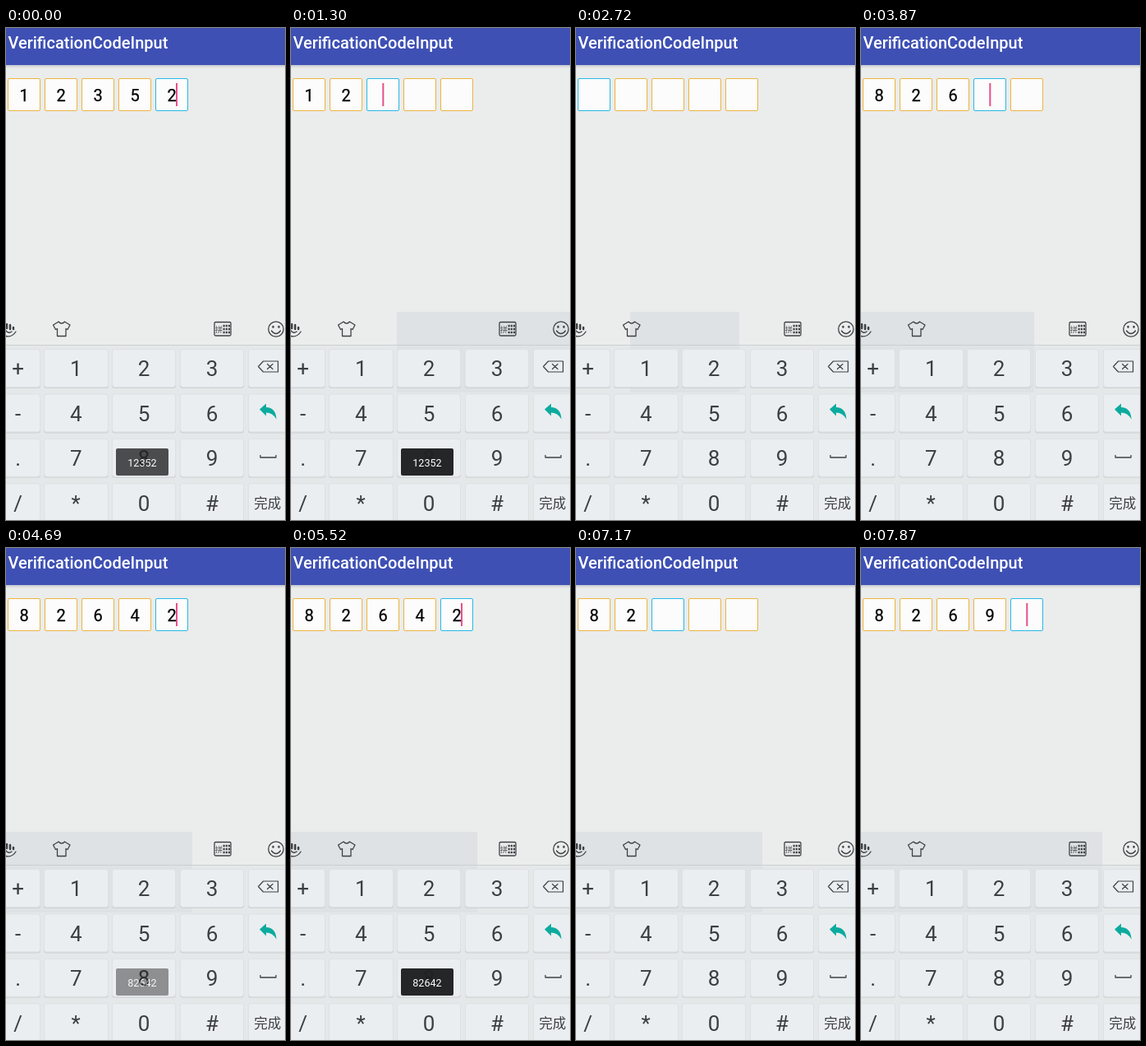
Recreate the animation shown at these times as an HTML page. Size 340x598 px, loop 7990 ms.

```html
<!DOCTYPE html>
<html lang="en">
<head>
<meta charset="utf-8">
<title>VerificationCodeInput</title>
<style>
  html, body { margin: 0; width: 100%; height: 100%; overflow: hidden; background: #ebecec; }
  svg { display: block; width: 340px; height: 598px; font-family: Roboto, "Noto Sans", sans-serif; }
  .mid { text-anchor: middle; }
  .key { fill: #ebeef0; stroke: #dee1e3; }
  .key.down { fill: #d0d5d8; }
  .label { font-size: 26px; fill: #3c3f42; }
  .icon { fill: none; stroke: #3f4245; stroke-width: 1.3; stroke-linejoin: round; stroke-linecap: round; }
  .cjk { font-family: "Noto Sans CJK SC", "Noto Sans CJK", sans-serif; }
  .box { fill: #fbfcfb; stroke: #ecb440; }
  .box.on { stroke: #27b9e6; }
</style>
</head>
<body>
<svg viewBox="0 0 340 598" id="stage">
  <defs>
    <linearGradient id="drop" x2="0" y2="1">
      <stop stop-color="#c6c8ce"/>
      <stop offset="1" stop-color="#ebecec"/>
    </linearGradient>
  </defs>
  <rect width="340" height="598" fill="#ebecec"/>
  <rect width="340" height="45" fill="#3e50b4"/>
  <rect y="45" width="340" height="4" fill="url(#drop)"/>
  <text x="2.4" y="24.600" font-size="20" font-weight="500" fill="#fff">VerificationCodeInput</text>

  <g id="boxes"></g>
  <rect id="caret" y="67" width="2" height="28" fill="#e8508a"/>
  <path id="handle" d="M162.300 96.500L171 106V126.500Q171 128 169.500 128H155Q153.500 128 153.500 126.500V106Z" fill="#434547"/>

  <rect y="386" width="340" height="212" fill="#e5e8e9"/>
  <rect id="shade" y="345" height="98" fill="#dfe2e4"/>
  <rect y="385" width="340" height="1" fill="#cdd0d2"/>

  <g class="icon">
    <path d="M-2 374Q7 377 12 369M0 368Q3 372 7 369"/>
    <path d="M1 360V365M5 361V366M9 364V366" stroke-width="2.500"/>
    <path d="M64 357L57.500 361L60.500 366.500L62.500 365.500V374.500H73V365.500L75 366.500L78 361L71.500 357Q67.800 361 64 357Z"/>
    <rect x="254" y="357.500" width="20" height="16.500" rx="1.500"/>
    <path d="M264.500 362H273M264.500 366H273M264.500 370H273" stroke-width="2.300" stroke-dasharray="2.200 1" stroke-linecap="butt"/>
    <circle cx="329" cy="366" r="9.200"/>
    <path d="M323.500 368Q329 375 334.500 368"/>
    <path d="M325.500 363V363.500M332.500 363V363.500" stroke-width="2.400"/>
  </g>
  <text class="mid cjk" x="259.500" y="369.500" font-size="9" fill="#3f4245">拼</text>

  <g id="keys"></g>
  <g class="icon">
    <path d="M307.500 411.500L313.500 405H331.500V418H313.500Z" stroke-width="1.200"/>
    <path d="M318.500 408.500L325 414.500M325 408.500L318.500 414.500" stroke-width="1.200"/>
    <path d="M310 519V522H329V519" stroke-linecap="butt"/>
  </g>
  <path d="M309 463.500L317 456.500V461Q329 461.500 329.500 475.500Q325 467.500 317 467.500V471.500Z" fill="#0cab9e"/>
  <text class="mid cjk" x="318.800" y="583.800" font-size="16.500" fill="#3c3f42">完成</text>

  <g id="toast">
    <rect x="134" y="511" width="64" height="33" rx="2" fill="#1e2022" fill-opacity=".97"/>
    <text id="message" class="mid" x="166" y="532.500" font-size="12.600" fill="#fff"></text>
  </g>
</svg>
<script>
const LOOP = 7990;
const $ = id => document.getElementById(id);

function add(parent, tag, attrs, text = '') {
  const el = document.createElementNS('http://www.w3.org/2000/svg', tag);
  for (const name in attrs) el.setAttribute(name, attrs[name]);
  el.textContent = text;
  parent.append(el);
  return el;
}

// Keyboard
const columns = [[-40, 82], [46, 79], [129, 78], [212, 78], [295, 60]];
const centres = [14.7, 85.2, 168, 251];
const rows = ['+123', '-456', '.789', '/*0#'];
const keys = {};
rows.forEach((row, r) => {
  columns.forEach(([x, width], c) => {
    const y = 390 + r * 54.4;
    const name = row[c] || 'side' + r;
    add($('keys'), 'rect', { x, y: y + 1.5, width, height: 46.5, rx: 3, fill: '#d0d4d6' });
    keys[name] = add($('keys'), 'rect', {
      class: 'key', x: x + .5, y: y + .5, width: width - 1, height: 46, rx: 3
    });
    if (row[c]) add($('keys'), 'text', { class: 'label mid', x: centres[c], y: y + 33.3 }, row[c]);
  });
});

// Code boxes
const boxes = [0, 1, 2, 3, 4].map(i => {
  const x = 2 + i * 45;
  return {
    frame: add($('boxes'), 'rect', { class: 'box', x: x + .5, y: 61.5, width: 39, height: 39, rx: 1.5 }),
    digit: add($('boxes'), 'text', {
      class: 'mid', x: x + 20, y: 89, 'font-size': 20, stroke: '#000', 'stroke-width': .25
    })
  };
});

// Each step changes only the listed properties; the rest carry over.
const steps = [
  [0, { code: '12352', focus: 4, caret: 1, toast: .81, message: '12352', shade: [0, 0], key: '', handle: 0 }],
  [120, { toast: 1 }],
  [260, { caret: 0 }],
  [700, { caret: 1 }],
  [1000, { code: '1235', key: 'side0', shade: [129, 340] }],
  [1150, { code: '123', focus: 3 }],
  [1300, { code: '12', focus: 2, key: '' }],
  [1600, { focus: 1, key: 'side0' }],
  [1740, { code: '1' }],
  [1880, { key: '', toast: .87 }],
  [2010, { focus: 0, key: 'side0', toast: .5 }],
  [2150, { code: '', toast: .15 }],
  [2290, { key: '', toast: 0, shade: [66, 199] }],
  [2720, { caret: 0 }],
  [3180, { caret: 1, key: '8' }],
  [3320, { code: '8', focus: 1 }],
  [3460, { key: '' }],
  [3600, { key: '2', shade: [0, 211] }],
  [3870, { code: '826', focus: 3, key: '' }],
  [4120, { key: '4' }],
  [4270, { code: '8264', focus: 4, key: '', shade: [0, 227] }],
  [4550, { code: '82642', toast: .15, message: '82642' }],
  [4690, { toast: .47 }],
  [4810, { toast: .81 }],
  [4960, { toast: 1, caret: 0 }],
  [5520, { caret: 1 }],
  [5790, { focus: 3 }],
  [5910, { handle: 1 }],
  [6190, { caret: 0 }],
  [6590, { code: '82', focus: 2, caret: 1, toast: .87 }],
  [6750, { handle: 0, toast: .5 }],
  [6890, { toast: .15 }],
  [7030, { toast: 0 }],
  [7170, { caret: 0 }],
  [7570, { code: '826', focus: 3, caret: 1 }],
  [7720, { key: '9' }],
  [7870, { code: '8269', focus: 4, key: '', shade: [0, 294] }]
];
let last = {};
const states = steps.map(([at, change]) => last = { ...last, ...change, at });

function show(s) {
  boxes.forEach(({ frame, digit }, i) => {
    frame.classList.toggle('on', i === s.focus);
    digit.textContent = s.code[i] || '';
  });
  for (const name in keys) keys[name].classList.toggle('down', name === s.key);
  const centre = 22 + s.focus * 45;
  $('caret').setAttribute('x', centre + (s.code[s.focus] ? 5 : -.7));
  $('caret').setAttribute('opacity', s.caret);
  $('handle').setAttribute('opacity', s.handle);
  $('toast').setAttribute('opacity', s.toast);
  $('message').textContent = s.message;
  $('shade').setAttribute('x', s.shade[0]);
  $('shade').setAttribute('width', s.shade[1] - s.shade[0]);
}

const start = performance.now();
let shown;
function tick() {
  const t = (performance.now() - start) % LOOP;
  const state = states.findLast(s => s.at <= t) || states[0];
  if (state !== shown) show(shown = state);
  requestAnimationFrame(tick);
}
tick();
</script>
</body>
</html>
```
